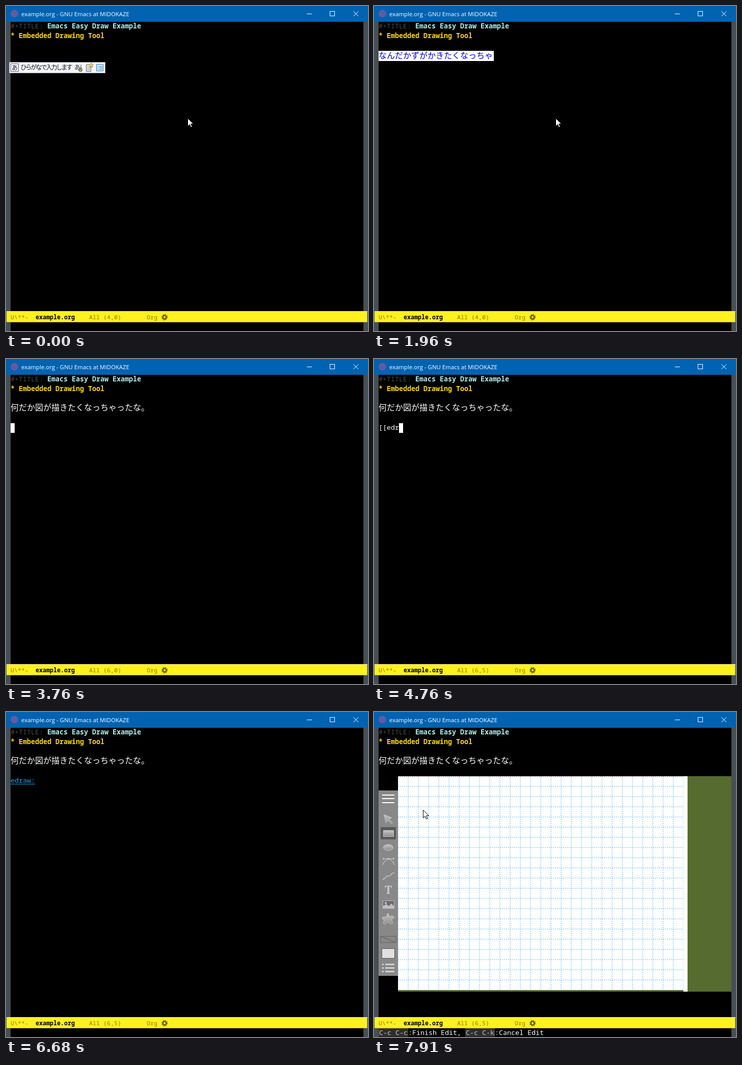
Write an HTML page that moves like this. It is 710 px wide and 638 px high and loops after 8 s.

```html
<!DOCTYPE html>
<html lang="ja">
<head>
<meta charset="utf-8">
<title>Easy Draw</title>
<style>
html, body { margin: 0; width: 100%; height: 100%; overflow: hidden; background: #000; }
svg { display: block; }
text { white-space: pre; }
.ui { font: 11.4px "Open Sans", "Noto Sans", sans-serif; fill: #fff; }
.code { font: 13.333px "Noto Sans Mono", monospace; fill: #fff; }
.mode { font: 11.667px "Noto Sans Mono", monospace; fill: #8a8000; }
.jp { font: 16px "Noto Sans CJK JP", "Noto Sans CJK", sans-serif; fill: #fff; }
.ime { font: 12px "Noto Sans CJK JP", "Noto Sans CJK", sans-serif; letter-spacing: -2px; fill: #111; }
.b { font-weight: bold; }
.crisp { shape-rendering: crispEdges; }
</style>
</head>
<body>
<svg width="710" height="638" viewBox="0 0 710 638">
  <defs>
    <linearGradient id="metal" x2="0" y2="1">
      <stop stop-color="#c4c4c4"/><stop offset="1" stop-color="#8e8e8e"/>
    </linearGradient>
    <g id="imeTools">
      <text class="ime" x="134" y="125" style="fill:#333">あ</text>
      <path d="M147 115v9" stroke="#444"/>
      <circle cx="146" cy="125" r="4" fill="var(--badge)"/>
      <path d="M144 125l2 2 3-4" fill="none" stroke="#fff"/>
      <path d="M157.500 115.500h9v13h-9z" fill="#fff" stroke="#555"/>
      <path d="M159 119.500h6M159 122.500h6M159 125.500h6" stroke="#777"/>
      <path d="M167 112l1.300 3 3.200.2-2.500 2 .9 3.200-2.900-1.800-2.800 1.800.8-3.200-2.500-2 3.200-.2z" fill="var(--star)" stroke="#875c20" stroke-width=".7"/>
      <path d="M177.500 114.500h13v13h-13z" fill="#d8f0ff" stroke="#2774b8"/>
      <path d="M179.500 118.500h2m1.500 0h6M179.500 121.500h2m1.500 0h6M179.500 124.500h2m1.500 0h6" stroke="#2774b8"/>
    </g>
  </defs>

  <rect width="710" height="638" fill="#0063b1"/>
  <rect x="1" y="31" width="708" height="607" fill="#4d4d4d"/>
  <rect x="9" y="31" width="692" height="607"/>
  <circle cx="16.500" cy="15" r="7.500" fill="#635a9f"/>
  <text class="ui" x="30" y="20">example.org - GNU Emacs at MIDOKAZE</text>
  <path d="M590 15.500h10M635.500 10.500h9v9h-9z" class="crisp" fill="none" stroke="#fff"/>
  <path d="M681.500 10.500l9.500 9.500m0-9.500l-9.500 9.500" stroke="#fff"/>

  <text class="code" x="9" y="44" style="fill:#454b4b">#+TITLE: <tspan class="b" fill="#afeeee">Emacs Easy Draw Example</tspan></text>
  <text class="code b" x="9" y="63" style="fill:#ffd700">* Embedded Drawing Tool</text>

  <g id="compose">
    <rect id="composeBox" x="9" y="88" height="20" fill="#fff"/>
    <text id="composeText" class="jp" x="9" y="103" style="fill:#0000d8"></text>
  </g>
  <rect id="cursor" fill="#fff"/>
  <text id="sentence" class="jp" x="9" y="101">何だか図が描きたくなっちゃったな。</text>
  <text id="typed" class="code" x="9" y="139"></text>
  <g id="link">
    <text class="code" x="9" y="139" style="fill:#1ea0f0">edraw:</text>
    <path d="M9 141.500h48" stroke="#1ea0f0"/>
  </g>

  <g id="editor">
    <path id="hover" d="M615 126h86v423h-86zM47 546h560v3h-560z" fill="#556b2f"/>
    <svg x="47" y="126" width="560" height="420">
      <rect width="560" height="420" fill="#fff"/>
      <path id="grid" stroke="#1e96ff" stroke-opacity=".75" stroke-dasharray="2"/>
      <path d="M0 0h560" stroke="#c04030" stroke-dasharray="2"/>
    </svg>
    <rect x="9" y="154" width="38" height="364" fill="#888"/>
    <path class="crisp" d="M16 163h24M16 170h24M16 178h24" stroke="#fff" stroke-width="2"/>
    <rect x="13" y="226" width="30" height="24" rx="1" fill="#595959"/>
    <g fill="url(#metal)" stroke="#c8c8c8">
      <path d="M19.500 201.500l4 16 3.500-5 7.500 7 2-2-7-7.500 5.500-2.500z"/>
      <path d="M18.500 232.500h20v12h-20z"/>
      <ellipse cx="28" cy="266" rx="9.500" ry="6"/>
      <path d="M27 395.500q2 0 2.500 6.500 8-3 9.500 0t-5.500 5.500q5 6 2.500 8t-9-4q-4 6-7 4.500t.500-8q-5-1-4-4t8-1.500q1-7 2.500-7z"/>
    </g>
    <g fill="none" stroke="#d0d0d0">
      <path d="M16.500 300q12-22 24 0M19 288h19" stroke-width="1.200"/>
      <path d="M17.500 287h2v2h-2zM27.500 287h2v2h-2zM37.500 287h2v2h-2z"/>
      <path d="M17 328c8 0 5-8 11-6s4-7 12-6" stroke-width="1.300"/>
    </g>
    <text x="28" y="357" text-anchor="middle" fill="#ccc" style="font:bold 21px 'Noto Serif',serif">T</text>
    <rect x="17.500" y="370.500" width="22" height="15" fill="#6b6b6b" stroke="#c0c0c0"/>
    <path d="M18 385v-4l6-4 5 4 5-5 5 5v4z" fill="#c0c0c0"/>
    <circle cx="23" cy="375" r="2" fill="#ccc"/>
    <path d="M13 440.500h30v12h-30zl30 12" fill="none" stroke="#6c6c6c" stroke-width="1.500"/>
    <rect x="15.500" y="464.500" width="25" height="19" fill="#e0e0e0" stroke="#555"/>
    <path class="crisp" d="M16 495h3m3 0h18M16 502h3m3 0h18M16 509h3m3 0h18" stroke="#d0d0d0" stroke-width="3"/>
    <g class="crisp" fill="#2e2e2e" stroke="#4a4a4a">
      <path d="M9.500 621.500h57v15h-57zM179.500 621.500h57v15h-57z"/>
    </g>
    <text class="code" x="10" y="634" style="fill:#ccc">C-c C-c</text>
    <text class="code" x="67" y="634">:Finish Edit, </text>
    <text class="code" x="180" y="634" style="fill:#ccc">C-c C-k</text>
    <text class="code" x="237" y="634">:Cancel Edit</text>
  </g>

  <rect x="1" y="599" width="708" height="22" fill="#fff020"/>
  <path class="crisp" d="M1 599.500h708" stroke="#fff890"/>
  <path class="crisp" d="M1 620.500h707.500V600" fill="none" stroke="#b8ac10"/>
  <text class="mode" x="9" y="615">U\**-</text>
  <text class="mode b" x="58" y="615" style="fill:#000">example.org</text>
  <text id="position" class="mode" x="163" y="615"></text>
  <text class="mode" x="276" y="615">Org</text>
  <g fill="none" stroke="#6e6500">
    <circle cx="311" cy="611" r="3.300" stroke-width="2.800"/>
    <circle cx="311" cy="611" r="5.200" stroke-width="2" stroke-dasharray="2.042"/>
  </g>

  <g id="imeOn" style="--badge:#6d7440;--star:#ffe34a">
    <rect x="6.500" y="110.500" width="188" height="21" fill="#f3f6fb" stroke="#9a9fa8"/>
    <rect x="9.500" y="113.500" width="15" height="15" fill="#fff" stroke="#4b4f9a"/>
    <text class="ime" x="11" y="125.500">あ</text>
    <text class="ime" x="28.500" y="125">ひらがなで入力します</text>
    <use href="#imeTools"/>
  </g>
  <g id="imeOff" style="--badge:#111;--star:#ff9d4d">
    <rect x="278.500" y="110.500" width="233" height="21" fill="#f3f6fb" stroke="#9a9fa8"/>
    <path d="M281.500 113.500h15v15h-15zl15 15m0-15l-15 15" fill="#c4c8c8" stroke="#777"/>
    <text class="ime" x="301.500" y="125">日本語入力オフ（カナロック）</text>
    <use href="#imeTools" x="317"/>
  </g>
  <path id="pointer" d="M.5.500v15.500l3.600-3.400 2.700 5.600 2.400-1.100-2.700-5.500h5z" fill="#fff" stroke="#000"/>
</svg>
<script>
const LOOP = 8000;
const $ = id => document.getElementById(id);
const kana = "なんだかずがかきたくなっちゃったな";
const sentence = $("sentence").textContent;

const compose = (t, count, extra = "") => [t, { compose: kana.slice(0, count) + extra }];
const cursorAt = (col, y = 126, h = 19) => [9 + col * 8, y, 8, h];
const type = (t, count) => [t, {
  typed: "[[edraw:]".slice(0, count), cursor: cursorAt(count), position: "6," + count
}];

// Each step lists only what changes at its time.
const steps = [
  [0, { position: "4,0", imeOn: true, pointer: [356, 220] }],
  [100, { imeOn: false, compose: "な" }],
  compose(200, 2), compose(300, 2, "た"), compose(460, 3), compose(560, 4),
  compose(860, 4, "す"), compose(960, 5), compose(1060, 5, "か"), compose(1160, 7),
  ...Array.from({ length: 10 }, (_, i) => compose(1360 + i * 100, 8 + i)),
  [2360, { compose: sentence }],
  [2660, { compose: "", sentence: true, pointer: null, cursor: cursorAt(34, 88) }],
  [2760, { position: "4,34" }],
  [2960, { imeOff: true }],
  [3060, { imeOff: false }],
  [3660, { position: "5,0", cursor: cursorAt(0, 107) }],
  [3760, { position: "6,0", cursor: cursorAt(0) }],
  type(4160, 1), type(4260, 2), type(4460, 3), type(4660, 4), type(4760, 5),
  type(4960, 6), type(5060, 7), type(5260, 8), type(5680, 9),
  [5780, { typed: "", link: true, cursor: cursorAt(6) }],
  [5880, { position: "6,6" }],
  [6180, { position: "6,5", cursor: cursorAt(5) }],
  [6680, { cursor: null }],
  [7090, { link: false, editor: true }],
  [7590, { cursor: [607, 126, 8, 423] }],
  [7690, { hover: true, pointer: [250, 208] }],
  [7790, { pointer: [146, 196] }],
  [7910, { pointer: [96, 192] }]
];

const show = (id, on) => { $(id).style.display = on ? "" : "none"; };

function render(state) {
  for (const id of ["imeOn", "imeOff", "compose", "sentence", "link", "editor", "hover", "cursor", "pointer"]) {
    show(id, state[id]);
  }
  const composed = state.compose || "";
  $("composeText").textContent = composed;
  $("composeBox").setAttribute("width", composed.length * 16 + 2);
  $("typed").textContent = state.typed || "";
  $("position").textContent = `All (${state.position})`;
  if (state.cursor) {
    ["x", "y", "width", "height"].forEach((name, i) => $("cursor").setAttribute(name, state.cursor[i]));
  }
  if (state.pointer) $("pointer").setAttribute("transform", `translate(${state.pointer})`);
}

let grid = "";
for (let x = 0; x <= 560; x += 20) grid += `M${x} 0v420`;
for (let y = 0; y <= 420; y += 20) grid += `M0 ${y}h560`;
$("grid").setAttribute("d", grid);

let shown = -1;
function tick() {
  const time = performance.now() % LOOP;
  const count = steps.filter(([t]) => t <= time).length;
  if (count !== shown) {
    shown = count;
    render(Object.assign({}, ...steps.slice(0, count).map(([, change]) => change)));
  }
  requestAnimationFrame(tick);
}
tick();
</script>
</body>
</html>
```
